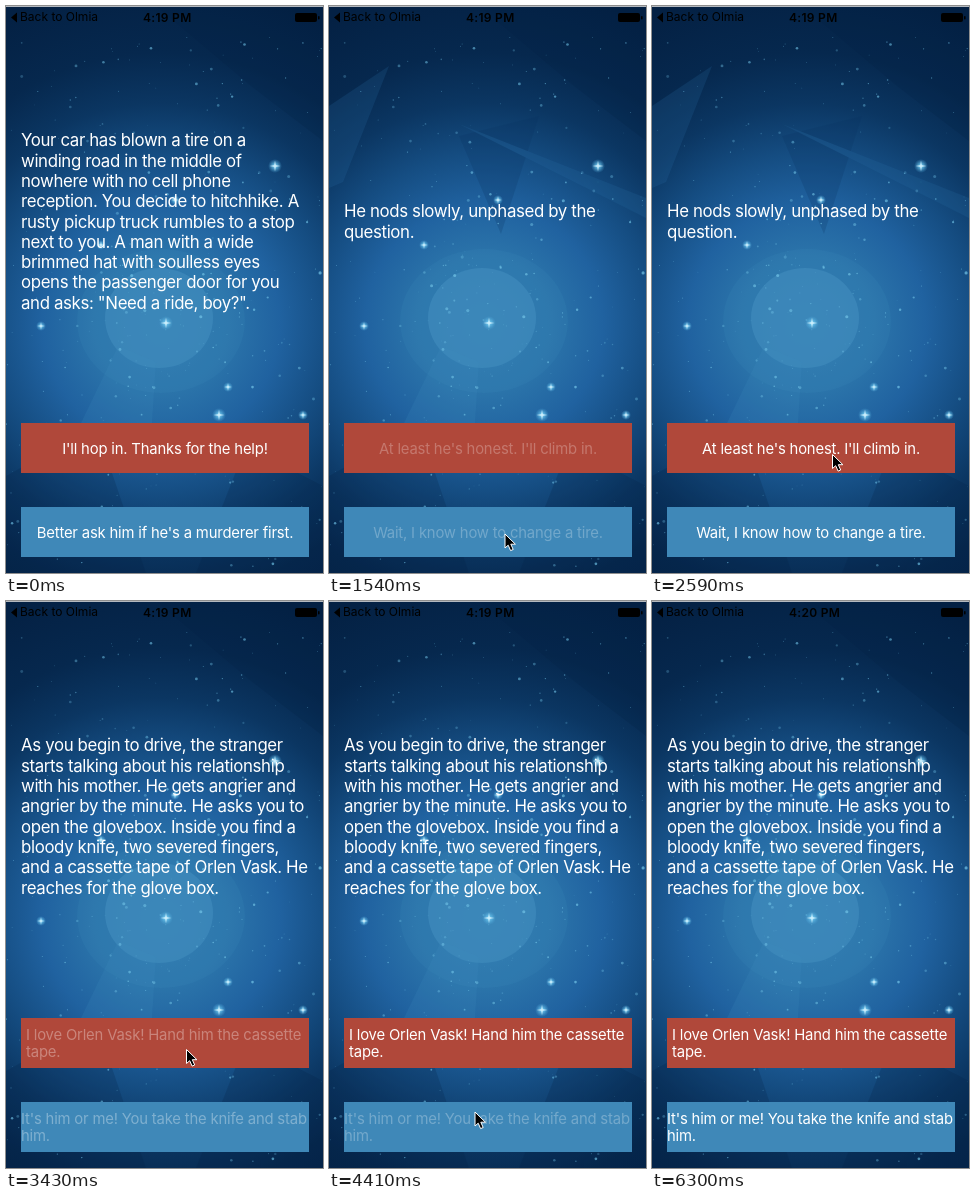
Recreate the animation shown at these times as an HTML page. Size 317 by 567 pixels, loop 6370 ms.

```html
<!DOCTYPE html>
<html lang="en">
<head>
<meta charset="utf-8">
<title>Roadside story</title>
<style>
  html, body { margin: 0; width: 100%; height: 100%; overflow: hidden; background: #06264c; }
  svg { display: block; width: 100%; height: 100%; }
  text { font-family: Inter, "Liberation Sans", sans-serif; white-space: pre; }
  #story { font-size: 16.85px; letter-spacing: -.37px; fill: #fff; }
  .title { font-size: 14.85px; letter-spacing: -.19px; fill: #fff; }
  .status { font-size: 12px; }
</style>
</head>
<body>
<svg viewBox="0 0 317 567">
  <defs>
    <radialGradient id="sky" gradientUnits="userSpaceOnUse" cx="155" cy="318" r="340">
      <stop offset="0" stop-color="#347fb4"/>
      <stop offset=".2" stop-color="#2b74aa"/>
      <stop offset=".35" stop-color="#2062a0"/>
      <stop offset=".5" stop-color="#154d82"/>
      <stop offset=".65" stop-color="#0b3662"/>
      <stop offset=".8" stop-color="#06284e"/>
      <stop offset="1" stop-color="#042144"/>
    </radialGradient>
    <radialGradient id="glow">
      <stop offset="0" stop-color="#d8f6ff"/>
      <stop offset=".3" stop-color="#6cc6ee" stop-opacity=".8"/>
      <stop offset="1" stop-color="#4aa5d8" stop-opacity="0"/>
    </radialGradient>
  </defs>

  <rect width="317" height="567" fill="url(#sky)"/>
  <g fill="#3f8bbd">
    <ellipse cx="155" cy="315" rx="84" ry="72" opacity=".15"/>
    <ellipse cx="153" cy="312" rx="54" ry="50" opacity=".7"/>
    <path d="M112 340L75 417H146L150 356Z" opacity=".18"/>
  </g>
  <g fill="#041f42" opacity=".2">
    <path d="M150 0H317V135L245 80Z"/>
    <path d="M0 470L90 420L140 567H0Z"/>
    <path d="M190 567L240 440L317 480V567Z"/>
  </g>
  <g id="facets" fill="#2a6ea6" opacity=".2">
    <path d="M60 60L14 176L0 182V100Z"/>
    <path d="M130 130L210 110L172 228Z" fill="#08305e"/>
    <path d="M130 118L317 192V212Z"/>
  </g>
  <g id="stars"></g>

  <rect width="317" height="1" fill="#b4b9bf"/>
  <path d="M5 11.5L11 6.5V16.5Z"/>
  <text class="status" x="14" y="15.3">Back to Olmia</text>
  <text class="status" id="clock" x="137" y="15.5" font-weight="600" letter-spacing=".3"></text>
  <rect x="289" y="7" width="22" height="9" rx="2"/>
  <rect x="312" y="10" width="1.6" height="3.5" rx=".8"/>

  <g id="story"></g>
  <rect x="15" y="417" width="288" height="50" fill="#b0483a"/>
  <g class="title" id="red"></g>
  <rect x="15" y="501" width="288" height="50" fill="#3f88b8"/>
  <g class="title" id="blue"></g>
  <path id="cursor" d="M0 0V14L3.2 11.2L5.6 16.6L8.2 15.5L5.8 10.2H10.4Z"
        stroke="#fff" stroke-linejoin="round"/>
</svg>
<script>
const LOOP = 6370, STEP = 70, FADE = 560;
const $ = id => document.getElementById(id);
const clamp = v => Math.max(0, Math.min(1, v));
const smooth = v => v * v * (3 - 2 * v);

const scenes = [
  {
    at: 0,
    story: ['Your car has blown a tire on a', 'winding road in the middle of', 'nowhere with no cell phone',
      'reception. You decide to hitchhike. A', 'rusty pickup truck rumbles to a stop',
      'next to you. A man with a wide', 'brimmed hat with soulless eyes',
      'opens the passenger door for you', 'and asks: "Need a ride, boy?".'],
    red: ["I'll hop in. Thanks for the help!"],
    blue: ["Better ask him if he's a murderer first."]
  },
  {
    at: 1470,
    story: ['He nods slowly, unphased by the', 'question.'],
    red: ["At least he's honest. I'll climb in."],
    blue: ['Wait, I know how to change a tire.']
  },
  {
    at: 3220,
    story: ['As you begin to drive, the stranger', 'starts talking about his relationship',
      'with his mother. He gets angrier and', 'angrier by the minute. He asks you to',
      'open the glovebox. Inside you find a', 'bloody knife, two severed fingers,',
      'and a cassette tape of Orlen Vask. He', 'reaches for the glove box.'],
    red: ['I love Orlen Vask! Hand him the cassette', 'tape.'],
    blue: ["It's him or me! You take the knife and stab", 'him.']
  }
];

const taps = [
  { id: 'blue', down: 1400, up: 1500 },
  { id: 'red', down: 3080, up: 3340 },
  { id: 'blue', down: 4130, up: 4360 }
];

// each glide of the pointer: start, end, and where its tip comes to rest
const glides = [
  [140, 630, 157, 580],
  [850, 1050, 176, 528],
  [2100, 2590, 180.5, 448.5],
  [3500, 4060, 146, 511],
  [4480, 5040, 154, 28],
  [5040, 5530, 176, -20]
];

function lines(list, x, y, gap, anchor = 'start') {
  return list.map((s, i) =>
    `<text x="${x}" y="${y + (i - (list.length - 1) / 2) * gap}" text-anchor="${anchor}">${s}</text>`).join('');
}

function button(list, y, left) {
  return list.length > 1 ? lines(list, left, y, 17.7) : lines(list, 159, y, 0, 'middle');
}

function drawStars() {
  let seed = 41, out = '';
  const rnd = () => (seed = seed * 16807 % 2147483647) / 2147483647;
  for (let i = 0; i < 340; i++) {
    const near = i % 5 === 0 ? .35 : 1;
    const x = 158 + (rnd() - .5) * 317 * near, y = 300 + (rnd() - .5) * 540 * near;
    const r = .4 + rnd() ** 3 * 1.2, o = .25 + rnd() * .5;
    out += `<circle cx="${x.toFixed(1)}" cy="${y.toFixed(1)}" r="${r.toFixed(2)}" fill="#6fc0e4" opacity="${o.toFixed(2)}"/>`;
  }
  const bright = [[269, 160], [213, 409], [160, 317], [35, 320], [222, 381], [297, 409], [169, 194], [95, 239]];
  bright.forEach(([x, y], i) => {
    const r = i < 3 ? 7 : 5;
    out += `<g transform="translate(${x} ${y}) scale(${r})"><circle r="1" fill="url(#glow)"/>
      <path fill="#d5f3ff" opacity=".7" d="M0-.8L.13-.13L.8 0L.13 .13L0 .8L-.13 .13L-.8 0L-.13-.13Z"/></g>`;
  });
  $('stars').innerHTML = out;
}

// a tap dims its own title at once, and the other one when the scene changes
function alpha(id, t, scene) {
  const tap = taps.filter(p => p.down <= t).pop();
  if (!tap || (tap.id !== id && scene.at < tap.down)) return 1;
  return .2 + .8 * clamp((t - tap.up) / FADE);
}

function pointer(t) {
  return glides.reduce(([x, y], [from, to, gx, gy]) => {
    const k = smooth(clamp((t - from) / (to - from)));
    return [x + (gx - x) * k, y + (gy - y) * k];
  }, [222, -20]);
}

let shown;
function show(scene) {
  if (scene === shown) return;
  shown = scene;
  $('story').innerHTML = lines(scene.story, 15, 221.5, 20.3);
  $('red').innerHTML = button(scene.red, 447.5, 20);
  $('blue').innerHTML = button(scene.blue, 531.5, 15);
  $('facets').style.display = scene === scenes[1] ? '' : 'none';
}

function render(ms) {
  const t = Math.floor(ms % LOOP / STEP) * STEP;
  const scene = scenes.filter(s => s.at <= t).pop();
  show(scene);
  for (const id of ['red', 'blue']) $(id).setAttribute('opacity', alpha(id, t, scene));
  $('clock').textContent = t < 6090 ? '4:19 PM' : '4:20 PM';
  $('cursor').setAttribute('transform', `translate(${pointer(t).map(v => v.toFixed(1))})`);
}

drawStars();
const start = performance.now();
(function tick() {
  render(performance.now() - start);
  requestAnimationFrame(tick);
})();
</script>
</body>
</html>
```
